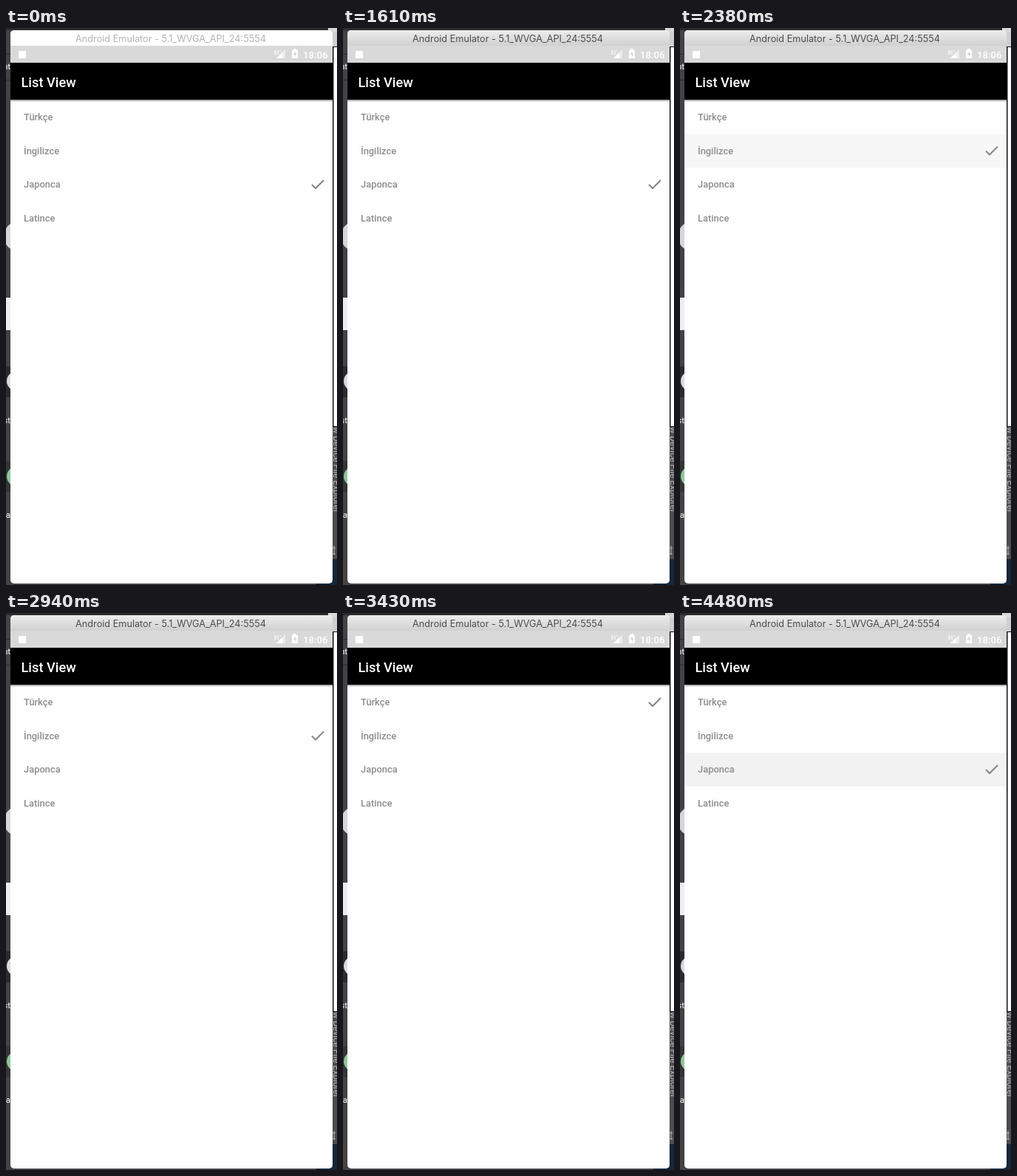
Write an HTML page that moves like this. It is 448 px wide and 754 px high and loops after 4690 ms.

```html
<!DOCTYPE html>
<html lang="tr">
<head>
<meta charset="utf-8">
<title>List View</title>
<style>
  html, body { margin: 0; width: 100%; height: 100%; overflow: hidden; background: #434345; }
  svg { display: block; width: 448px; height: 754px; }
  text { font-family: Roboto, sans-serif; }
  .title { font: 12.7px Inter, sans-serif; text-anchor: middle; }
  .desk { font-size: 11.5px; fill: #fff; text-anchor: end; }
  .item { font-size: 12.9px; font-weight: 500; fill: #8d8d8d; }
</style>
</head>
<body>
<svg viewBox="0 0 448 754">
  <defs>
    <linearGradient id="bar" x2="0" y2="1">
      <stop stop-color="#ededed"/><stop offset="1" stop-color="#d0d0d0"/>
    </linearGradient>
    <linearGradient id="shadow" x2="0" y2="1">
      <stop stop-color="#8c8c8c"/><stop offset="1" stop-color="#fefefe"/>
    </linearGradient>
    <clipPath id="frame"><rect x="6" y="3" width="436" height="749" rx="5"/></clipPath>
  </defs>

  <!-- desktop behind the window -->
  <rect width="448" height="754" fill="#434345"/>
  <rect width="448" height="3" fill="#2b2b2d"/>
  <path d="M0 35.5H6M0 70.5H6" stroke="#2c2c2e"/>
  <text class="desk" x="6" y="56">nt</text>
  <circle cx="17" cy="282" r="20" fill="#d6d6d6"/>
  <rect y="365" width="6" height="44" fill="#ededed"/>
  <rect y="458" width="6" height="42" fill="#2b2b2d"/>
  <circle cx="14" cy="478" r="13" fill="#dcdcdc"/>
  <text class="desk" x="6" y="535">st</text>
  <rect y="586" width="6" height="42" fill="#353537"/>
  <circle cx="14" cy="607" r="13" fill="#8fc79b"/>
  <text class="desk" x="6" y="663">na</text>
  <rect x="436" width="12" height="6" fill="#d8d8d8"/>
  <rect x="442" y="6" width="6" height="20" fill="#cfcfcf"/>
  <rect x="442" y="25" width="6" height="515" fill="#111"/>
  <rect x="443.5" y="26" width="5" height="513" fill="#fff"/>
  <rect x="442" y="540" width="6" height="179" fill="#4b4d4f"/>
  <text transform="translate(443 540) rotate(90)" font-size="12" fill="#b5b5b5">w Device File Explorer</text>
  <path d="M442 704h4M444 701v12M441 712h5" stroke="#b5b5b5" fill="none"/>
  <path d="M420 751H442V719H448V754H420Z" fill="#15263b"/>

  <!-- emulator window -->
  <g clip-path="url(#frame)">
    <rect x="6" y="3" width="436" height="749" fill="#fefefe"/>
    <rect id="titleBar" x="6" y="3" width="436" height="21"/>
    <text id="title" class="title" x="223" y="19">Android Emulator - 5.1_WVGA_API_24:5554</text>
    <rect x="6" y="24" width="436" height="23" fill="#d9d9d9"/>
    <rect x="17" y="31" width="10" height="10" fill="#fff"/>
    <path d="M366 41L378 29V41Z" fill="#fff" opacity=".55"/>
    <path d="M366 41L374 33V41Z" fill="#fff"/>
    <path d="M363 31h3m-3 2h3m-3 2h3M368 30v6M370 31h2" stroke="#fff"/>
    <path d="M387 30h2v-2h4v2h2v11h-8Z" fill="#fff"/>
    <path d="M391.5 31.5L389 36h2v3l2.500-4.500h-2Z" fill="#d0d0d0"/>
    <text x="435.500" y="40.500" font-size="13.200" font-weight="500" fill="#fff" text-anchor="end">18:06</text>
    <rect id="press" x="6" width="436" height="45.500"/>
    <rect x="6" y="97" width="436" height="3" fill="url(#shadow)"/>
    <rect x="6" y="47" width="436" height="50" fill="#000"/>
    <text x="20.500" y="79.500" font-size="18.200" font-weight="500" fill="#fff">List View</text>
    <g id="items"></g>
    <path id="check" d="M414 0.500L419 5.500L430 -5.500" fill="none" stroke="#858585" stroke-width="2"/>
  </g>
</svg>
<script>
const LOOP = 4690, ROW = 45.5, TOP = 98;
const $ = id => document.getElementById(id);
const set = (id, attrs) => {
  for (const name in attrs) $(id).setAttribute(name, attrs[name]);
};

$('items').innerHTML = ['Türkçe', 'İngilizce', 'Japonca', 'Latince']
  .map((name, i) => `<text class="item" x="24" y="${TOP + ROW * i + 27.3}">${name}</text>`).join('');

// [start, row]: the checked row from that time on
const checks = [[0, 2], [2310, 1], [3010, 0], [3640, 2]];
// [start, end, row, colour]: touch feedback
const presses = [
  [2380, 2450, 1, '#f7f7f7'],
  [3080, 3290, 0, '#f7f7f7'],
  [3710, 3920, 2, '#f7f7f7'],
  [4200, LOOP, 2, '#f2f2f2']
];

function draw(now) {
  const t = now % LOOP;
  const active = t >= 1610;
  set('titleBar', { fill: active ? 'url(#bar)' : '#fefefe' });
  set('title', { fill: active ? '#4c4c4c' : '#b4b4b4' });

  const row = checks.filter(c => t >= c[0]).pop()[1];
  set('check', { transform: `translate(0 ${TOP + ROW * row + 22.5})` });

  const press = presses.find(p => t >= p[0] && t < p[1]);
  set('press', press ? { y: TOP + ROW * press[2], fill: press[3] } : { fill: 'none' });
  requestAnimationFrame(draw);
}
draw(performance.now());
</script>
</body>
</html>
```
